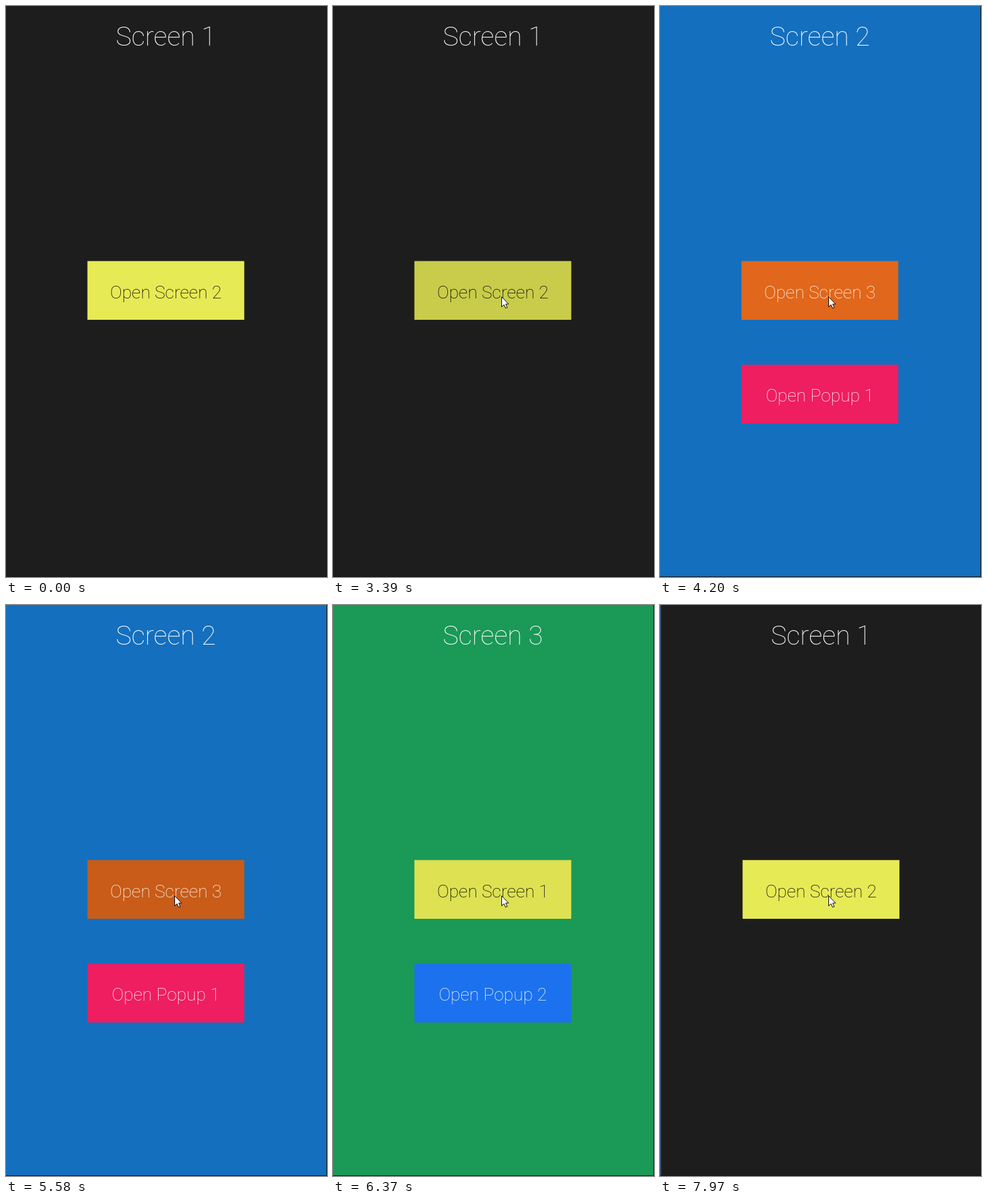
An HTML page that plays this animation: 511x908 px, repeating every 7990 ms.

```html
<!DOCTYPE html>
<html lang="en">
<head>
<meta charset="utf-8">
<title>Screen transitions</title>
<style>
  html, body { margin: 0; width: 100%; height: 100%; overflow: hidden; background: #141414; }
  svg { display: block; }
  text { font-family: Roboto, sans-serif; font-weight: 100; text-anchor: middle; }
</style>
</head>
<body>
<svg id="stage" width="511" height="908" viewBox="0 0 511 908"></svg>
<script>
const W = 510, H = 907, LOOP = 7990;

const screens = [
  { title: 'Screen 1', fill: '#1d1d1d', enter: [1, 0], exit: [-1, 0],
    buttons: [['Open Screen 2', '#e6ea55', '#000']] },
  { title: 'Screen 2', fill: '#146fbe', enter: [1, 0], exit: [-1, 0],
    buttons: [['Open Screen 3', '#e66a1c', '#fff'], ['Open Popup 1', '#ee1e61', '#fff']] },
  { title: 'Screen 3', fill: '#1b9956', enter: [0, 1], exit: [0, -1],
    buttons: [['Open Screen 1', '#e6ea55', '#000'], ['Open Popup 2', '#1c71ef', '#fff']] },
];

// Screen i is left at switches[i] for the next one.
const switches = [3485, 5655, 7405];
const hovers = [1730, 4180, 6340];
const presses = [3360, 5580, 7330];

// [time, x, y] of the pointer tip
const pointerPath = [
  [50, 36, 0], [120, 92, 74], [180, 118, 170], [240, 155, 310], [300, 250, 450], [360, 295, 496],
  [770, 295, 496], [800, 284, 497], [1100, 284, 497], [1200, 279, 502],
  [2780, 279, 502], [3110, 268, 462],
];

const label = (s, y, size, fill) =>
  `<text x="254.5" y="${y}" font-size="${size}" fill="${fill}">${s}</text>`;

const box = (y, fill, extra = '') =>
  `<rect x="129.6" y="${y}" width="249.7" height="93.4" fill="${fill}" ${extra}/>`;

const button = ([s, fill, ink], i) => {
  const y = 405.6 + i * 164.9;
  const shade = i ? '' : box(y, '#000', 'class="shade"');
  return box(y, fill) + shade + label(s, y + 58.9, 28.3, ink);
};

const panel = s => `<g class="screen">
  <rect width="${W}" height="${H}" fill="${s.fill}"/>
  ${label(s.title, 63, 42.4, '#fff')}${s.buttons.map(button).join('')}</g>`;

const stage = document.getElementById('stage');
stage.innerHTML = `
  <clipPath id="view"><rect width="${W}" height="${H}"/></clipPath>
  <g clip-path="url(#view)">
    <rect width="${W}" height="${H}" fill="#314e78"/>
    ${screens.map(panel).join('')}
    <path id="pointer" d="M.5 .5V16.5L4.2 13L6.8 18.6L9.4 17.5L6.9 12H11.5Z"
      fill="#fff" stroke="#000"/>
  </g>`;

const panels = [...stage.querySelectorAll('.screen')];
const shades = [...stage.querySelectorAll('.shade')];
const pointer = document.getElementById('pointer');

const clamp = x => Math.min(1, Math.max(0, x));
const easeOutExpo = x => x >= 1 ? 1 : 1 - 2 ** (-10 * x);

function place(el, x, y) {
  el.setAttribute('transform', `translate(${x} ${y})`);
}

function drawScreen(i, t) {
  const { enter, exit } = screens[i];
  const since = t - switches[i];
  // The first screen is already open at the start and comes back after the last switch.
  const reopened = i === 0 && t >= switches[2];
  const entry = i ? switches[i - 1] : reopened ? switches[2] : -1000;
  let dir = enter, amount = 1 - easeOutExpo(clamp((t - entry) / 700));
  if (since >= 0 && !reopened) {
    dir = exit;
    amount = 1.05 * easeOutExpo(clamp(since / 350));
  }
  place(panels[i], dir[0] * amount * W, dir[1] * amount * H);

  const dim = since > 700 ? 0
    : 0.04 * clamp((t - hovers[i]) / 30) + 0.09 * (t >= presses[i]);
  shades[i].setAttribute('fill-opacity', dim);
}

function drawPointer(t) {
  pointer.style.display = t < 50 ? 'none' : '';
  const next = pointerPath.findIndex(p => p[0] > t);
  const b = next < 0 ? pointerPath.at(-1) : pointerPath[next];
  const a = next > 0 ? pointerPath[next - 1] : b;
  const k = a === b ? 0 : (t - a[0]) / (b[0] - a[0]);
  place(pointer, a[1] + (b[1] - a[1]) * k, a[2] + (b[2] - a[2]) * k);
}

const start = performance.now();
function frame() {
  const t = (performance.now() - start) % LOOP;
  screens.forEach((_, i) => drawScreen(i, t));
  drawPointer(t);
  requestAnimationFrame(frame);
}
frame();
</script>
</body>
</html>
```
